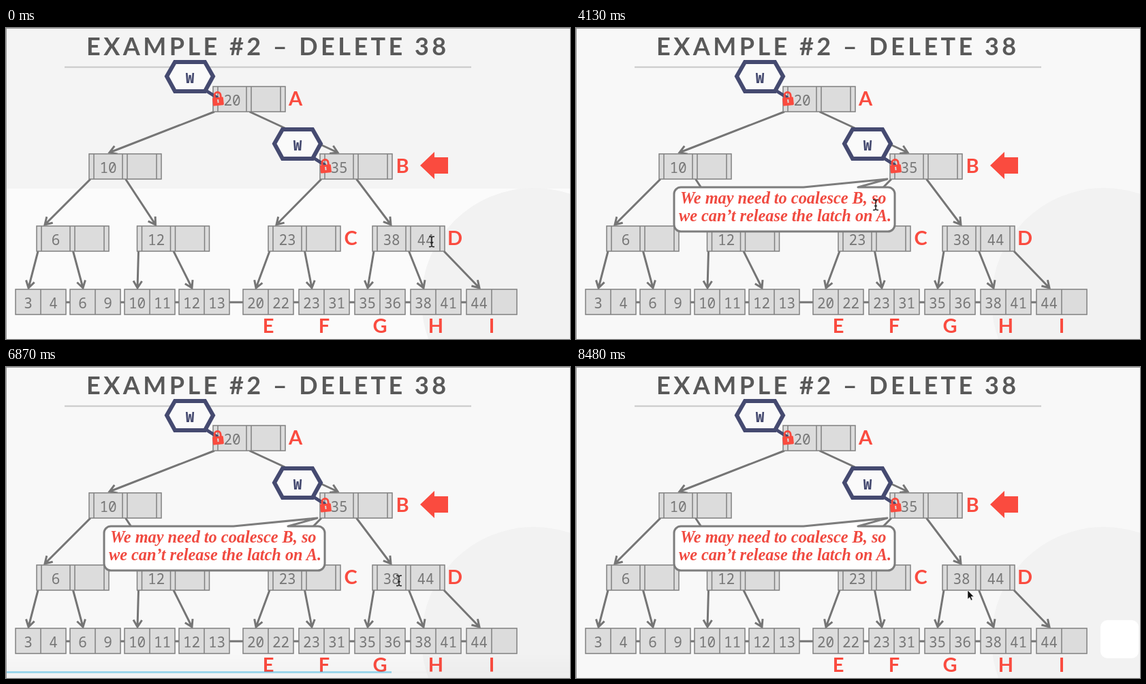
Animation, 828 px wide and 457 px high, one loop 8.63 s. Source, as an HTML page:

```html
<!DOCTYPE html>
<html lang="en">
<head>
<meta charset="utf-8">
<title>Tree deletion</title>
<style>
  html, body { margin: 0; width: 100%; height: 100%; overflow: hidden; background: #f7f7f7; }
  svg { display: block; width: 828px; height: 457px; }
  .node { fill: #dcdcdc; stroke: #808080; stroke-width: 1.5; }
  .edge { fill: none; stroke: #757575; stroke-width: 3; }
  .num { font: 21px "Noto Sans Mono", monospace; fill: #777; text-anchor: middle; }
  .name { font: 700 29px Lato, sans-serif; fill: #fa4b3f; text-anchor: middle; }
  .title { font: 700 36px Lato, sans-serif; fill: #595959; letter-spacing: 4.45px; }
  .mark { font: 700 21px "Noto Sans Mono", monospace; fill: #454a70; text-anchor: middle; }
  .say { font: italic 700 24.3px "Liberation Serif", serif; fill: #f04a40; }
</style>
</head>
<body>
<svg viewBox="0 0 828 457">
  <defs>
    <linearGradient id="shade" x1="0" y1="0" x2="0" y2="1">
      <stop offset="0" stop-color="#000" stop-opacity="0"/>
      <stop offset="1" stop-color="#000" stop-opacity=".07"/>
    </linearGradient>
    <g id="latch">
      <path d="M292 91L311 103" stroke="#454a70" stroke-width="5"/>
      <path d="M236 71L248 50H292L304 71L292 93H248Z" fill="#fafafa" stroke="#454a70" stroke-width="6"/>
      <text class="mark" x="270" y="81">W</text>
      <g transform="rotate(-6 311 104)">
        <path d="M306.500 104V99a4.500 4.500 0 0 1 9 0V104" fill="none" stroke="#fa4b3f" stroke-width="3"/>
        <rect x="303" y="102" width="16" height="12" rx="1.5" fill="#fa4b3f"/>
        <path d="M311 105V110" stroke="#dcdcdc" stroke-width="2"/>
      </g>
    </g>
  </defs>

  <rect width="828" height="457" fill="#f8f8f8"/>
  <g id="bands">
    <rect width="828" height="236" fill="#f4f4f4"/>
    <rect y="236" width="828" height="221" fill="#fbfbfb"/>
  </g>
  <circle cx="775" cy="400" r="165" fill="#f2f2f2"/>
  <path d="M0 .5H828M.5 0V457" stroke="#999"/>
  <path d="M86 57.5H683" stroke="#c8c8c8" stroke-width="2"/>
  <text class="title" x="118" y="39.5">EXAMPLE #2 – DELETE 38</text>

  <g id="tree"></g>

  <use href="#latch"/>
  <use href="#latch" x="158" y="99"/>
  <path d="M608 202L629 182V190H649V214H629V222Z" fill="#fa4b3f"/>

  <g id="bubble">
    <path d="M154 234H334L457 222L414 234H458a10 10 0 0 1 10 10V289a10 10 0 0 1-10 10H154a10 10 0 0 1-10-10V244a10 10 0 0 1 10-10Z"
      fill="#fff" stroke="#7d7d7d" stroke-width="3" stroke-linejoin="round"/>
    <text class="say" x="153" y="258">We may need to coalesce B, so</text>
    <text class="say" x="151" y="284">we can’t release the latch on A.</text>
  </g>

  <rect id="badge" x="770" y="372" width="56" height="56" rx="10" fill="#fff"/>
  <g id="controls">
    <rect y="417" width="828" height="40" fill="url(#shade)"/>
    <path d="M1 448.5H828" stroke="#e4e4e4" stroke-width="3"/>
    <path d="M1 448.5H566" stroke="#0a9fd4" stroke-width="3"/>
  </g>
  <path id="pointer" d="M90 420V436L93.500 432.500L96 438.500L98.500 437.500L96 431.500H100.500Z" fill="#fff" stroke="#333"/>
  <path id="beam" d="M-4 -7.500H-1.500L0 -6L1.500 -7.500H4M0 -6V6M-4 7.500H-1.500L0 6L1.500 7.500H4M-2 1.500H2" fill="none" stroke="#222" stroke-width="1.500"/>
  <path id="arrow" d="M575 328V341L578 338.500L580 343L582 342L580 337.500H584Z" fill="#111" stroke="#eee" stroke-width=".6"/>
</svg>
<script>
  const LOOP = 8630;
  const LEVELS = [86, 185, 291, 384];
  const $ = id => document.getElementById(id);
  const edges = [], nodes = [];

  const path = (cls, d) => `<path class="${cls}" d="${d}"/>`;
  const text = (cls, x, y, s) => `<text class="${cls}" x="${x}" y="${y}">${s}</text>`;

  function edge(x1, y1, x2, y2) {
    const a = Math.atan2(y2 - y1, x2 - x1);
    const barb = turn => `${x2 - 12 * Math.cos(a + turn)} ${y2 - 12 * Math.sin(a + turn)}`;
    edges.push(path('edge', `M${x1} ${y1}L${x2} ${y2}M${barb(.55)}L${x2} ${y2}L${barb(-.55)}`));
  }

  const label = (name, x, y) => name && nodes.push(text('name', x, y + 28, name));

  // Draws a branch with its subtree; tip is where the incoming arrow lands.
  function branch(x, tip, keys, kids, name) {
    return level => {
      const y = LEVELS[level];
      nodes.push(path('node', `M${x} ${y}h106v37h-106zm7 0v37m42 -37v37m7 -37v37m43 -37v37`));
      keys.forEach((k, i) => nodes.push(text('num', x + 28 + 50 * i, y + 28, k)));
      label(name, x + 121, y);
      kids.forEach((kid, i) => edge(x + 2 + 51.5 * i, y + 37, kid(level + 1), LEVELS[level + 1] - 2));
      return x + tip;
    };
  }

  let leafCount = 0;
  function leaf(keys, name) {
    const i = leafCount++;
    const x = i < 4 ? 14 + 80 * i : 348 + 82 * (i - 4);
    return () => {
      nodes.push(path('node', `M${x} 384h74v37h-74zm37 0v37`));
      keys.forEach((k, j) => nodes.push(text('num', x + 18.5 + 37 * j, 412, k)));
      label(name, x + 37, 420);
      return x + 19;
    };
  }

  branch(304, 0, [20], [
    branch(122, 30, [10], [
      branch(45, 12, [6], [leaf([3, 4]), leaf([6, 9])]),
      branch(192.5, 27, [12], [leaf([10, 11]), leaf([12, 13])])
    ]),
    branch(461, 26, [35], [
      branch(385, 12, [23], [leaf([20, 22], 'E'), leaf([23, 31], 'F')], 'C'),
      branch(538, 27, [38, 44], [leaf([35, 36], 'G'), leaf([38, 41], 'H'), leaf([44], 'I')], 'D')
    ], 'B')
  ], 'A')(0);
  $('tree').innerHTML = edges.join('') + path('edge', 'M88 403H676') + nodes.join('');

  const ramp = (t, from, to) => Math.min(1, Math.max(0, (t - from) / (to - from)));
  const easeOut = u => 1 - (1 - u) ** 3;

  // The beam rests at each stop, then glides to the next one.
  const glides = [
    { from: 4129, to: 4130, x: 440, y: 260 },
    { from: 4200, to: 4900, x: 330, y: 104 },
    { from: 5800, to: 6490, x: 577, y: 314 },
    { from: 6990, to: 7270, x: 613, y: 405 },
    { from: 7900, to: 8400, x: 579, y: 342 }
  ];

  function beamAt(t) {
    let x = 625, y = 314;
    for (const g of glides) {
      const u = easeOut(ramp(t, g.from, g.to));
      x += (g.x - x) * u;
      y += (g.y - y) * u;
    }
    return [x, y];
  }

  const show = (id, amount) => $(id).setAttribute('opacity', +amount);

  function draw(now) {
    const t = now % LOOP;
    $('beam').setAttribute('transform', `translate(${beamAt(t)})`);
    show('beam', t < 8480);
    show('arrow', t >= 8480);
    show('bands', t < 1830);
    show('bubble', t >= 930);
    show('controls', ramp(t, 6720, 7110) - ramp(t, 7890, 8050));
    show('badge', ramp(t, 7300, 7660));
    show('pointer', t >= 7420 && t < 7900);
  }

  let start;
  function tick(now) {
    start ??= now;
    draw(now - start);
    requestAnimationFrame(tick);
  }
  draw(0);
  requestAnimationFrame(tick);
</script>
</body>
</html>
```
